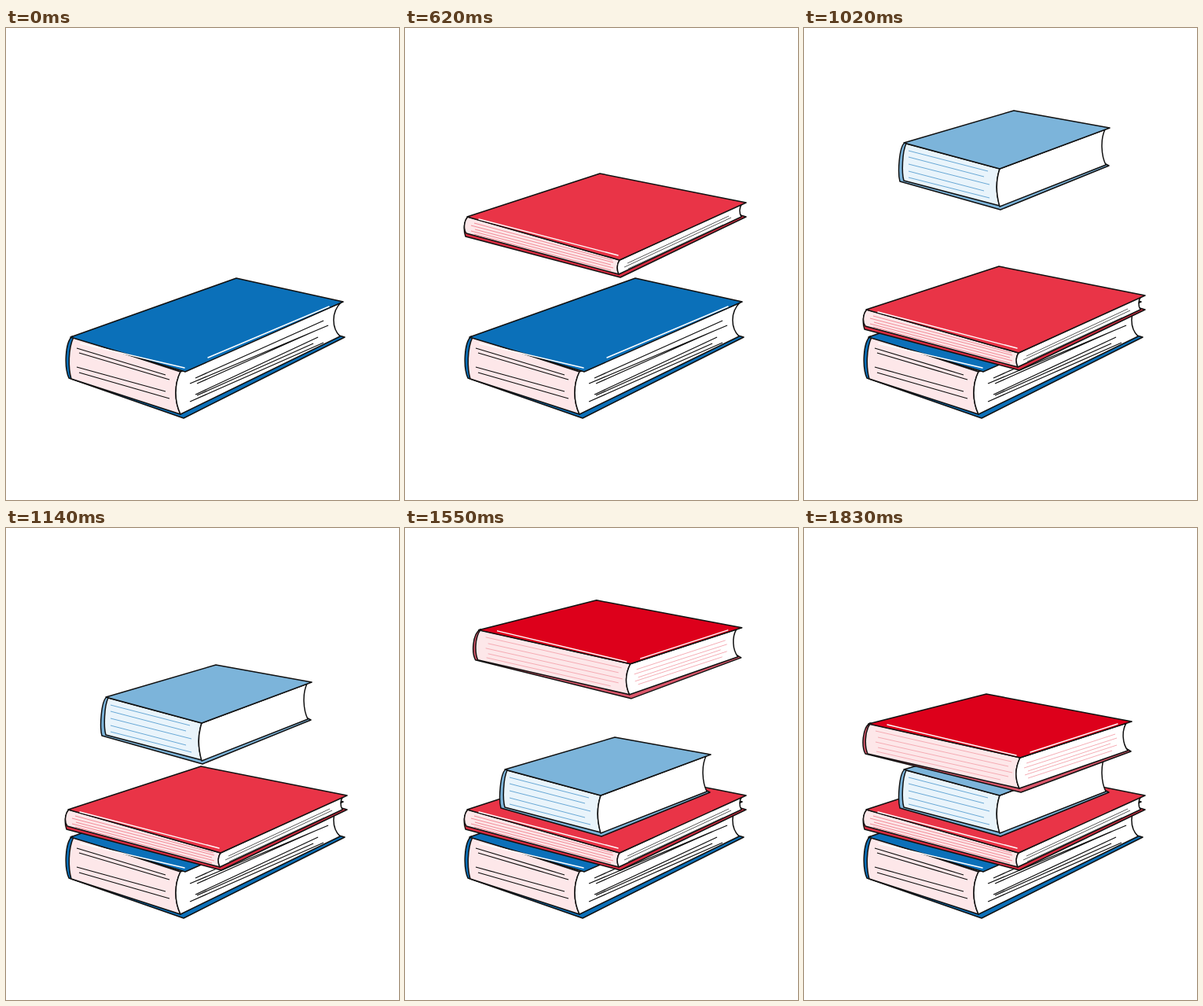
Recreate the animation shown at these times as an HTML page. Size 500 by 600 pixels, loop 2.91 s.

```html
<!DOCTYPE html>
<html lang="en">
<head>
<meta charset="utf-8">
<title>Stack of books</title>
<style>
  html, body { margin: 0; width: 100%; height: 100%; overflow: hidden; background: #fff; }
  svg { display: block; width: 500px; height: 600px; fill: none; }
  path { stroke: #111; stroke-width: 1.5; stroke-linejoin: round; }
  .pages { fill: #fff; }
  .shine { stroke: #fff; stroke-width: 1.4; stroke-linecap: round; }
  .ink { stroke-width: 1.25; }
  .thin { stroke: #333; stroke-width: .8; }
  .rose { stroke: #f0808d; stroke-width: .9; }
  .pale { stroke: #f4a5ae; stroke-width: .9; }
  .sky { stroke: #69a9d6; stroke-width: 1; }
</style>
</head>
<body>
<svg viewBox="0 0 500 600">
  <g class="book">
    <path fill="#0b70b9" d="M84 392C75 400 74 432 80 445L226 496L431 393L424 391L222 437Z"/>
    <path fill="#fde7e9" d="M86 393C79 408 79 432 83 446L222 491C214 474 214 453 222 437Z"/>
    <path class="pages" d="M222 437L426 349C414 361 414 381 425 392L222 491C214 474 214 453 222 437Z"/>
    <path fill="#0b70b9" d="M293 318L429 348L228 437L82 393Z"/>
    <path class="shine" d="M95 401L227 432M257 419L411 354"/>
    <path class="ink" d="M90 407L203 441M93 413L208 447M90 431L203 462M93 438L208 471
      M241 445L404 372M234 452L410 378M243 452L391 386M241 466L397 393M234 475L404 400M243 467L391 401"/>
  </g>
  <g class="book">
    <path fill="#d82c41" d="M80 358C75 363 74 375 77 383L274 435L434 358L427 356L271 413Z"/>
    <path fill="#fde7e9" d="M80 358C75 363 74 374 78 379L272 431C269 424 269 419 273 413Z"/>
    <path class="pages" d="M273 413L429 341C425 346 425 353 428 358L272 431C269 424 269 419 273 413Z"/>
    <path fill="#e93447" d="M248 303L434 340L273 413L79 358Z"/>
    <path class="shine" d="M94 361L271 407"/>
    <path class="rose" d="M88 366L264 413M84 369L265 416M89 374L262 419M84 376L265 423M88 380L262 426"/>
    <path class="thin" d="M283 417L412 357M279 422L415 359M284 424L405 368"/>
  </g>
  <g class="book">
    <path fill="#7cb4da" d="M128 307C121 312 119 345 122 356L250 392L388 336L382 333L247 340Z"/>
    <path fill="#e9f4fb" d="M130 308C125 318 124 345 127 355L249 387C244 371 244 355 249 340Z"/>
    <path class="pages" d="M249 340L383 290C377 302 378 323 384 335L249 388C244 371 244 355 249 340Z"/>
    <path fill="#7cb4da" d="M267 266L389 288L249 340L127 307Z"/>
    <path class="sky" d="M133 317L234 343M133 325L229 350M133 334L236 360M133 343L229 368M133 351L236 377"/>
  </g>
  <g class="book">
    <path fill="#d9566a" d="M84 248C74 254 73 278 78 287L276 336L416 284L411 281L272 292Z"/>
    <path fill="#fde7e9" d="M84 249C77 259 77 278 81 287L274 331C268 318 269 304 275 292Z"/>
    <path class="pages" d="M275 292L410 248C404 258 405 274 412 283L274 331C268 318 269 304 275 292Z"/>
    <path fill="#dd001b" d="M232 211L417 246L275 292L82 249Z"/>
    <path class="shine" d="M106 250L270 289M288 285L399 249"/>
    <path class="pale" d="M91 258L264 297M94 266L260 303M91 272L265 311M94 279L260 316M92 284L250 320
      M283 299L396 262M280 305L398 267M285 309L390 274M281 314L398 276M285 318L392 283"/>
  </g>
</svg>
<script>
const LOOP = 2910, STEP = 40;
const books = document.querySelectorAll('.book');

// start time, steps until contact, starting offset
const drops = [
  { book: books[1], start: 460, steps: 8, dx: 0, dy: -236 },
  { book: books[2], start: 940, steps: 9, dx: 0, dy: -207 },
  { book: books[3], start: 1510, steps: 6, dx: 14, dy: -143 }
];

function place({ book, start, steps, dx, dy }, t) {
  const n = Math.floor((t - start) / STEP);
  const left = Math.max(0, 1 - n / steps);
  const dip = n === steps + 1 ? 3 : 0; // brief sink after landing
  book.setAttribute('visibility', n < 0 ? 'hidden' : 'visible');
  book.setAttribute('transform', `translate(${dx * left} ${dy * left + dip})`);
}

const origin = performance.now();

function draw() {
  const t = (performance.now() - origin) % LOOP;
  for (const drop of drops) place(drop, t);
  requestAnimationFrame(draw);
}

draw();
</script>
</body>
</html>
```
